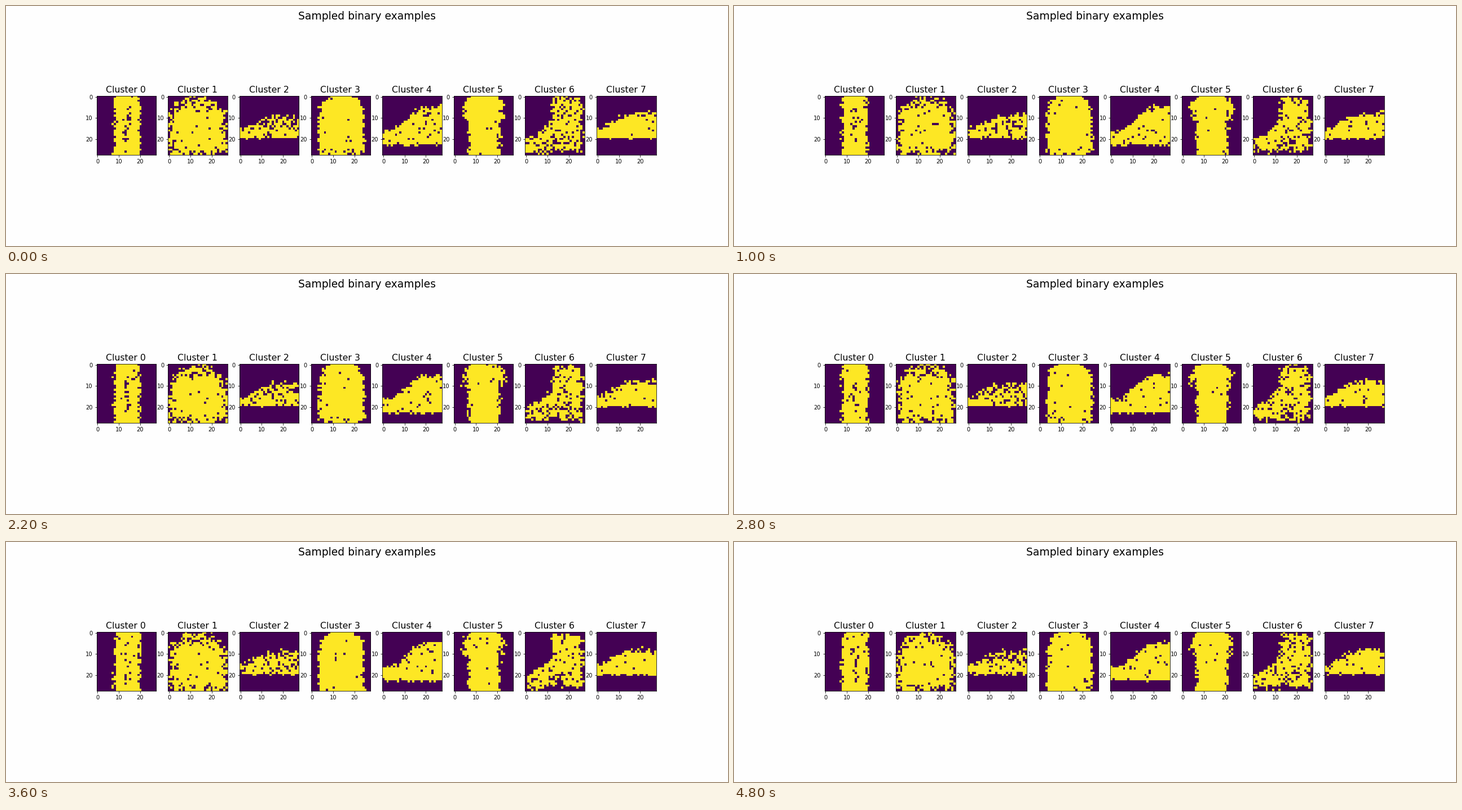
Write a matplotlib script that moves like this. It is 1280 by 427 pixels and loops after 5000 ms.

```python
import numpy as np
import matplotlib.pyplot as plt
from matplotlib.animation import FuncAnimation

W, H, DPI = 1280, 427, 72
N = 28
FRAMES, STEP = 25, 200

row, col = np.mgrid[0:N, 0:N].astype(float)


def ramp(dist, width):
    """Soft edge: 0 outside, 1 inside, 0.5 on the outline."""
    return np.clip(dist / width + 0.5, 0, 1)


def half_width(wide, drop, rate):
    """Rounded shoulders that widen downwards."""
    return wide - drop * np.exp(-row / rate)


def garment(center, half, soft):
    return ramp(half - abs(col - center), soft)


def shoe(height, rise, reach, power, sole):
    """Toe on the left, rising to the given height on the right."""
    top = height + rise * np.exp(-(col / reach) ** power)
    return ramp(row - top, 2.8) * ramp(sole - row, 1.3)


def trousers():
    gap = 0.42 * np.exp(-((row - 15) / 9) ** 4 - ((col - 13.7) / 1.4) ** 2)
    return 0.98 * garment(13.7, half_width(5.9, 0.9, 1), 2.3) * (1 - gap)


def pullover():
    fill = 0.97 * np.clip((row + 8) / 16, 0, 1) * np.clip((31 - row) / 7.5, 0, 1)
    return fill * garment(13.7, half_width(13.2, 9, 4), 5.5)


def sandal():
    return np.where(row > 15, 0.85, 0.7) * shoe(8.8, 6.4, 9, 2, 19.6)


def coat():
    fill = 0.985 * np.clip((36 - row) / 12, 0, 1)
    return fill * garment(13.7, half_width(10.5, 5, 2.5), 2)


def ankle_boot():
    return 0.94 * shoe(5, 11.3, 12.5, 3, 22.7)


def shirt():
    sleeve = 2.6 * ramp(11 - row, 2)
    p = 0.985 * garment(13.6, half_width(7.3, 4, 2) + sleeve, 2.6)
    cuff = (row > 6) & (row < 12) & (abs(col - 13.6) > 7)
    return np.where(cuff, 0.65 * p, p)


def tall_boot():
    left = np.maximum(0.4, 13 * (1 - (row / 20) ** 4))
    right = half_width(26.3, 5, 1.2)
    arch = 0.35 * np.exp(-((row - 23) / 4) ** 4 - ((col - 16) / 4) ** 2)
    fill = 0.87 * ramp(row - 0.6, 3) * ramp(25.8 - row, 3.2)
    return fill * ramp(col - left, 2.8) * ramp(right - col, 2.8) * (1 - arch)


def sneaker():
    return 0.96 * shoe(8.2, 7, 9, 2, 19.8)


shapes = [trousers, pullover, sandal, coat, ankle_boot, shirt, tall_boot,
          sneaker]
probs = np.array([shape() for shape in shapes])
samples = np.random.default_rng(7).random((FRAMES, *probs.shape)) < probs

plt.rcParams.update({"font.family": "DejaVu Sans", "font.size": 9.9})
fig, axes = plt.subplots(1, len(probs), figsize=(W / DPI, H / DPI), dpi=DPI,
                         facecolor="#fefefe")
nudge = 0.6 / W
fig.subplots_adjust(left=0.125 + nudge, right=0.9 + nudge, bottom=0.125,
                    top=0.88, wspace=0.2)
fig.suptitle("Sampled binary examples", x=0.4997, fontsize=18.8)

images = []
for i, ax in enumerate(axes):
    images.append(ax.imshow(samples[0, i], cmap="viridis", vmin=0, vmax=1,
                            interpolation="nearest"))
    ax.set_title(f"Cluster {i}", x=0.494, fontsize=15.8)
    ax.set_xticks(range(0, N, 10))
    ax.set_yticks(range(0, N, 10))


def update(n):
    for image, sample in zip(images, samples[n]):
        image.set_data(sample)
    return images


anim = FuncAnimation(fig, update, frames=FRAMES, interval=STEP, repeat=True,
                     repeat_delay=0, blit=False)
plt.show()
```
